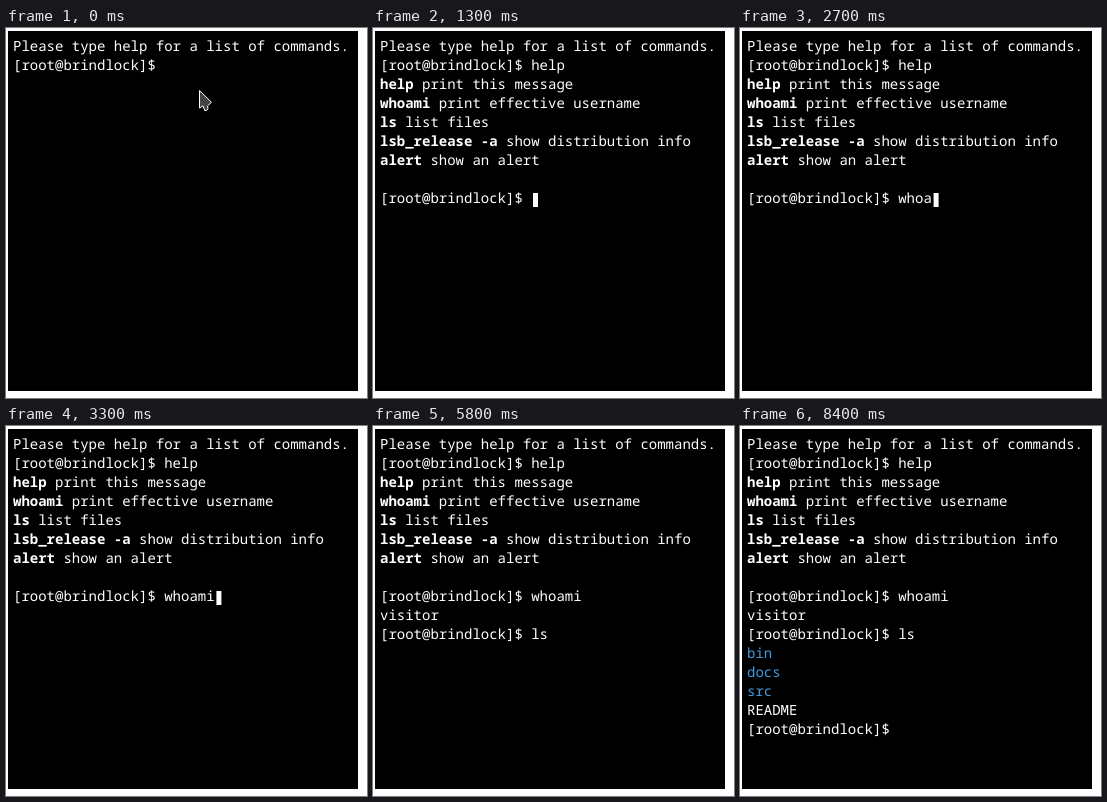
Write an HTML page that moves like this. It is 361x370 px and loops after 8500 ms.

```html
<!DOCTYPE html>
<html lang="en">
<head>
<meta charset="utf-8">
<title>Terminal</title>
<style>
  html, body { margin: 0; width: 100%; height: 100%; overflow: hidden; background: #fff; }
  svg { display: block; }
  text {
    font: 14px "Noto Sans Mono", monospace;
    fill: #fff;
    white-space: pre;
    text-rendering: geometricPrecision;
  }
  .cmd { font-weight: 700; }
  .dir { fill: #429ae0; }
</style>
</head>
<body>
<svg id="stage" width="361" height="370" viewBox="0 0 361 370">
  <rect x="2" y="3" width="350" height="360"/>
  <g id="rows"></g>
  <rect id="caret" width="5" height="14" fill="#fff"/>
  <path id="mouse" d="M.5 .5V18L4 15.8L5.7 20.5H7.5L9 18.8L8.5 16L12.5 12.3Z"
        fill="#444" stroke="#fff" stroke-linejoin="round"/>
</svg>
<script>
const LOOP = 8500, LINE = 19, CHAR = 8.4, BLINK = 500;
const PROMPT = '[root@brindlock]$ ';
const $ = id => document.getElementById(id);

const entry = (bold, rest) => [[bold, 'cmd'], [' ' + rest, '']];
const dir = name => [[name, 'dir']];
const plain = s => [[s, '']];

// Each command: key times, time of Enter, and the lines it prints.
const commands = [
  { text: 'help', keys: [400, 600, 800, 900], enter: 1300, output: [
    entry('help', 'print this message'),
    entry('whoami', 'print effective username'),
    entry('ls', 'list files'),
    entry('lsb_release -a', 'show distribution info'),
    entry('alert', 'show an alert'),
    plain('')
  ] },
  { text: 'whoami', keys: [2400, 2500, 2600, 2700, 2800, 2900], enter: 3700,
    output: [plain('visitor')] },
  { text: 'ls', keys: [5400, 5500], enter: 6100,
    output: [dir('bin'), dir('docs'), dir('src'), plain('README')] },
  { text: '', keys: [], enter: Infinity, output: [] }
];

const pointer = [
  { from: 0, to: 300, x: 193, y: 62 },
  { from: 7700, to: 7800, x: 192, y: 53 }
];

function screenAt(t) {
  const lines = [plain('Please type help for a list of commands.')];
  for (const { text, keys, enter, output } of commands) {
    const typed = keys.filter(k => k <= t).length;
    lines.push(plain(PROMPT + text.slice(0, typed)));
    if (t < enter) return { lines, typed };
    lines.push(...output);
  }
}

const lineMarkup = (parts, i) =>
  `<text x="7" y="${23 + i * LINE}">` +
  parts.map(([s, cls]) => `<tspan class="${cls}">${s}</tspan>`).join('') +
  '</text>';

const show = (el, on) => el.setAttribute('visibility', on ? 'visible' : 'hidden');
const place = (el, x, y) => el.setAttribute('transform', `translate(${x} ${y})`);

let shown = '';
function render(t) {
  const { lines, typed } = screenAt(t);
  const markup = lines.map(lineMarkup).join('');
  if (markup !== shown) $('rows').innerHTML = shown = markup;

  const lit = t >= 300 && t < 8400 && (t - 300) % (2 * BLINK) < BLINK;
  place($('caret'), 160 + typed * CHAR, 13 + (lines.length - 1) * LINE);
  show($('caret'), lit);

  const spot = pointer.find(p => t >= p.from && t < p.to);
  if (spot) place($('mouse'), spot.x, spot.y);
  show($('mouse'), spot);
}

const start = performance.now();
function tick() {
  render((performance.now() - start) % LOOP);
  requestAnimationFrame(tick);
}
tick();
</script>
</body>
</html>
```
